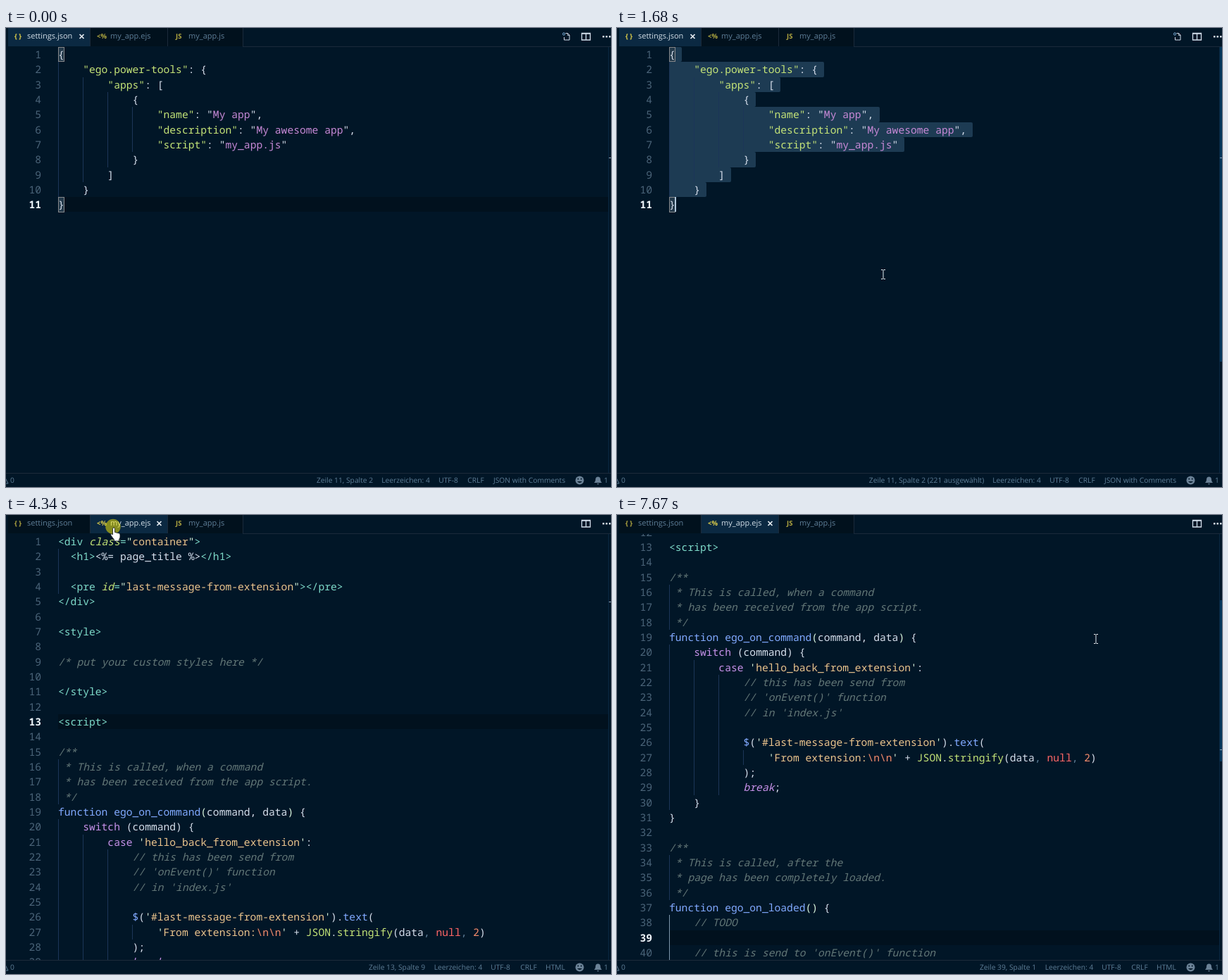
Write an HTML page that moves like this. It is 859x652 px and loops after 8 s.

```html
<!DOCTYPE html>
<html lang="en">
<head>
<meta charset="utf-8">
<title>Editor</title>
<style>
html, body { margin: 0; width: 100%; height: 100%; overflow: hidden; background: #011627; }
#stage { position: relative; width: 859px; height: 652px; overflow: hidden; background: #011627;
  font-family: "Open Sans", "Noto Sans", sans-serif; text-rendering: geometricPrecision; }
#stage div, svg { position: absolute; }
svg { left: 0; top: 0; overflow: visible; }
[hidden] { display: none !important; }

.tab { top: 0; height: 26px; background: #01111d; border-right: 1px solid #1b2a3b; box-sizing: border-box;
  font-size: 11px; line-height: 24px; color: #5f7e97; white-space: pre; }
.tab.on { background: #0b2942; color: #d2dee7; }
.tab .icon { color: #e0d04a; opacity: .8; font-weight: 700; }
.tab.on .icon { opacity: 1; }
.rule { left: 336px; top: 26px; width: 523px; height: 1px; background: #1a293a; }

#view { left: 0; top: 27px; width: 859px; height: 605px; overflow: hidden; }
.code { left: 0; top: 0; width: 859px; font: 14.66px/21.33px "Noto Sans Mono", "DejaVu Sans Mono", monospace; }
.line, .num { padding-top: 1px; white-space: pre; }
.line { left: 74px; color: #d6deeb; }
.num { left: 0; width: 50px; text-align: right; color: #4b6479; }
.num.on { color: #eef4fa; font-weight: 700; }
.hl { background: #01111e; }
.sel { background: #1d3b53; border-radius: 0 2px 2px 0; }
.guide { background: #1c3558; }
.guide.on { background: #7e97ac; }
.match { background: #243a4b; border: 1px solid #85878a; box-sizing: border-box; }
.caret { background: #b4c9db; }
.k { color: #c5e478; } .v { color: #c789d6; } .t { color: #7fdbca; } .s { color: #ecc48d; }
.q { color: #d9f5dd; } .b { color: #82aaff; } .p { color: #c792ea; } .n { color: #f78c6c; }
.r { color: #ff6666; } .d { color: #5f7e97; }
.a { color: #c5e478; font-style: italic; }
.c { color: #637777; font-style: italic; }
.i { color: #c792ea; font-style: italic; }

.edge { left: 855px; top: 27px; width: 1px; height: 605px; background: #0a2740; }
.slider { left: 856px; width: 3px; background: #04365a; }
.mark { left: 856px; width: 3px; height: 1px; background: #8fa6b8; }

#status { left: 0; top: 632px; width: 859px; height: 20px; border-top: 1px solid #1d2a3a;
  box-sizing: border-box; font-size: 10.25px; line-height: 20px; color: #5f7e97; white-space: pre; }
#status .item { transform: translateX(-50%); }
</style>
</head>
<body>
<div id="stage">
  <div class="rule"></div>
  <div id="view"></div>
  <div class="edge"></div>
  <div id="status"></div>
  <svg width="859" height="652" fill="none">
    <g id="openIcon" stroke="#d6deeb">
      <path d="M794.500 7.500h3l2.500 2.500v7h-7.500v-4"/>
      <circle cx="792" cy="8.500" r="1.600" stroke="#7fb2dc"/>
      <path d="M797.500 7.500v3h2.500" stroke-width=".8"/>
    </g>
    <path d="M817.500 7.500h12v9.500h-12zM823.500 8v9M817 8h13" stroke="#d6deeb" stroke-width="1.300"/>
    <path d="M847 11h2.500v2.500h-2.500zM851.500 11h2.500v2.500h-2.500zM856 11h2.500v2.500h-2.500z" fill="#d6deeb"/>
    <path d="M-4 647L-1 639L3 647z" stroke="#5f7e97"/>
    <circle cx="814.500" cy="642.500" r="6" fill="#6b8297"/>
    <path d="M811 644q3.500 4 7 0z" fill="#011627"/>
    <path d="M812.300 639.500v2M816.700 639.500v2" stroke="#011627" stroke-width="1.500"/>
    <path d="M835 646q2-1.500 2-4.500q0-4 3.500-4t3.500 4q0 3 2 4.500zM839 647h3l-1.500 1.800z" fill="#6b8297"/>
    <circle id="click" r="10.700" fill="#fff000" fill-opacity=".5"/>
    <g id="beam" stroke="#e6ebf0">
      <path d="M-3 -6.500h2.500M.500 -6.500h2.500M0 -6v12M-3 6.500h2.500M.500 6.500h2.500"/>
    </g>
    <path id="hand" fill="#fff" stroke="#101820" stroke-width=".8"
      d="M-1.500 1.500q0-1.500 1.500-1.500t1.500 1.500v5l6 1.500q1.500.500 1.500 2v3q0 2-1.500 3.500v2.500h-7v-2l-4.500-6q-.800-1.500.500-2t2 1z"/>
    <path id="arrow" fill="#fff" stroke="#101820" stroke-width=".8" d="M0 0v13l3-2.800l2 4.600l2-.9l-2-4.500h4z"/>
  </svg>
</div>
<script>
const LOOP = 8000, LINE = 64 / 3, CHAR = 8.796, LEFT = 74, VIEW = 605;
const $ = id => document.getElementById(id);
const stage = $('stage');

// "~x" switches to the colour class x
const JSON_LINES = [
  '{',
  '    ~k"ego.power-tools"~w: {',
  '        ~k"apps"~w: [',
  '            {',
  '                ~k"name"~w: "~vMy app~w",',
  '                ~k"description"~w: "~vMy awesome app~w",',
  '                ~k"script"~w: "~vmy_app.js~w"',
  '            }',
  '        ]',
  '    }',
  '}'
];
const EJS_LINES = [
  '~t<div ~aclass~t=~q"~scontainer~q"~t>',
  '  ~t<h1>~w<%= page_title %>~t</h1>',
  '',
  '  ~t<pre ~aid~t=~q"~slast-message-from-extension~q"~t></pre>',
  '~t</div>',
  '',
  '~t<style>',
  '',
  '~c/* put your custom styles here */',
  '',
  '~t</style>',
  '',
  '~t<script>',
  '',
  '~c/**',
  ' ~c* This is called, when a command',
  ' ~c* has been received from the app script.',
  ' ~c*/',
  '~bfunction ego_on_command~q(~wcommand, data~q) ~w{',
  '    ~pswitch ~w(command) {',
  '        ~pcase ~q\'~shello_back_from_extension~q\'~w:',
  '            ~c// this has been send from',
  '            ~c// \'onEvent()\' function',
  '            ~c// in \'index.js\'',
  '',
  '            ~b$~w(~q\'~s#last-message-from-extension~q\'~w).~btext~w(',
  '                ~q\'~sFrom extension:~n\\n\\n~q\'~w + ~kJSON~w.~kstringify~w(data~d, ~rnull~d, ~n2~w)',
  '            );',
  '            ~ibreak~w;',
  '    }',
  '}',
  '',
  '~c/**',
  ' ~c* This is called, after the',
  ' ~c* page has been completely loaded.',
  ' ~c*/',
  '~bfunction ego_on_loaded~q() ~w{',
  '    ~c// TODO',
  '',
  '    ~c// this is send to \'onEvent()\' function'
];

function add(parent, cls, text, box = {}) {
  const el = document.createElement('div');
  el.className = cls;
  el.textContent = text;
  for (const key in box) el.style[key] = box[key] + 'px';
  parent.append(el);
  return el;
}
const plain = line => line.replace(/~./g, '');
const lineTop = n => Math.round((n - 1) * LINE);
const lineBox = (n, left, width) => ({ left, width, top: lineTop(n), height: lineTop(n + 1) - lineTop(n) });

function indents(lines) {
  const own = lines.map(l => l ? plain(l).search(/\S/) : -1);
  return own.map((k, i) => k < 0 ? Math.min(own[i - 1], own[i + 1] ?? 0) : k);
}

function makeEditor(lines, total, matches) {
  const root = add($('view'), 'code', '');
  const ed = { root, nums: [], range: total * LINE - LINE + VIEW };
  ed.hl = add(root, 'hl', '', { left: LEFT, width: 782 });
  ed.sel = add(root, '', '');
  ed.match = add(root, '', '');
  matches.forEach(([n, col]) =>
    add(ed.match, 'match', '', lineBox(n, Math.floor(LEFT + col * CHAR), 9)));
  ed.bright = [];
  indents(lines).forEach((depth, i) => {
    for (let col = 0; col < depth; col += 4) {
      const g = add(root, 'guide', '', lineBox(i + 1, Math.floor(LEFT + col * CHAR), 1));
      if (i > 36) ed.bright.push(g);
    }
  });
  lines.forEach((line, i) => {
    const n = i + 1, text = plain(line), top = lineTop(n);
    const len = text.length + (n < lines.length ? 1 : 0);
    add(ed.sel, 'sel', '', lineBox(n, LEFT, len * CHAR));
    ed.nums.push(add(root, 'num', n, { top }));
    const row = add(root, 'line', '', { top });
    ('~w' + line).split('~').slice(1).forEach(part => {
      const span = document.createElement('span');
      span.className = part[0];
      span.textContent = part.slice(1);
      row.append(span);
    });
  });
  ed.caret = add(root, 'caret', '', { width: 2 });
  return ed;
}

const json = makeEditor(JSON_LINES, 11, [[1, 0], [11, 0]]);
const ejs = makeEditor(EJS_LINES, 47.6, [[13, 0], [13, 7]]);
const slider = add(stage, 'slider', '');
const mark = add(stage, 'mark', '');

// left, width, icon, icon x, label, label x
const tabs = [
  [3, 117, '{ }', 9, 'settings.json', 27],
  [120, 110, '<%', 9, 'my_app.ejs', 28],
  [230, 107, 'JS', 11, 'my_app.js', 29]
].map(([left, width, icon, ix, label, lx]) => {
  const el = add(stage, 'tab', '', { left, width });
  add(el, 'icon', icon, { left: ix, fontSize: 9.5 });
  add(el, '', label, { left: lx });
  const x = document.createElementNS('http://www.w3.org/2000/svg', 'svg');
  x.innerHTML = `<path d="M${width - 15.5} 9l6 6m0-6l-6 6" stroke="#e8eef4" stroke-width="1.7"/>`;
  el.append(x);
  return { el, x };
});
stage.append(stage.querySelector('#stage > svg'));

const status = $('status');
add(status, '', '0', { left: 6 });
add(status, '', '1', { left: 849 });
const items = Array.from({ length: 5 }, () => add(status, 'item', ''));
const JSON_BAR = [[481, ''], [567.5, 'Leerzeichen: 4'], [628, 'UTF-8'], [667, 'CRLF'], [743, 'JSON with Comments']];
const EJS_BAR = [[555, ''], [642, 'Leerzeichen: 4'], [702, 'UTF-8'], [742, 'CRLF'], [780, 'HTML']];

const BLINKS = [590, 1070, 1600, 2230, 2700, 3160, 3560, 4340, 4410, 4870, 5340, 5810, 6330, 6800, 7200, 7670];
const CLICKS = [[590, 670, 375.5, 349], [3560, 3640, 375.5, 349], [4340, 4410, 152, 16.5]];
const out = p => 1 - (1 - p) ** 2;
const smooth = p => p * p * (3 - 2 * p);
// start, end, steps, from, to, easing
const MOVES = [
  [130, 440, 5, [440, 811], [378, 350], out],
  [3715, 4262, 8, [378, 350], [153, 18], smooth],
  [5180, 5870, 10, [153, 18], [841, 133], smooth],
  [6030, 6330, 5, [841, 133], [680, 176], smooth]
];

function mouseAt(t) {
  let pos = MOVES[0][3];
  for (const [t0, t1, steps, from, to, ease] of MOVES) {
    if (t < t0) break;
    const k = Math.min(steps, 1 + Math.floor((t - t0) / (t1 - t0) * (steps - 1) + 1e-6));
    const p = ease(k / steps);
    pos = from.map((v, i) => v + (to[i] - v) * p);
  }
  return pos;
}

const within = (t, a, b) => t >= a && t < b;

function drawMouse(t) {
  const [x, y] = mouseAt(t);
  const kind = y > 632 ? 'arrow' : y > 27 ? 'beam' : x < 336 ? 'hand' : 'arrow';
  for (const id of ['beam', 'hand', 'arrow']) {
    const el = $(id);
    el.style.display = t >= 130 && id === kind ? '' : 'none';
    el.setAttribute('transform', `translate(${Math.round(x)} ${Math.round(y)})`);
  }
  const hit = CLICKS.find(([a, b]) => within(t, a, b));
  $('click').style.display = hit ? '' : 'none';
  if (hit) $('click').setAttribute('transform', `translate(${hit[2]} ${hit[3]})`);
}

function render(t) {
  const second = t >= 4340, paged = t >= 7120;
  const ed = second ? ejs : json;
  const selected = within(t, 1600, 3560);
  const row = !second ? 11 : paged ? 39 : 13;
  const scroll = paged ? 248 : 0;

  json.root.hidden = second;
  ejs.root.hidden = !second;
  ed.root.style.top = -scroll + 'px';
  ed.sel.hidden = !selected;
  ed.hl.hidden = selected;
  ed.hl.style.top = lineTop(row) + 'px';
  ed.hl.style.height = ed.caret.style.height = '21px';
  ed.match.hidden = second ? !within(t, 4410, 7120) : within(t, 1770, 3640);
  ed.nums.forEach((el, i) => el.classList.toggle('on', i + 1 === row));
  ed.bright.forEach(g => g.classList.toggle('on', paged));
  ed.caret.hidden = BLINKS.filter(b => b <= t).length % 2 === 0;
  ed.caret.style.left = (!second ? 82 : paged ? 74 : 143) + 'px';
  ed.caret.style.top = lineTop(row) + 'px';

  const scale = VIEW / ed.range;
  slider.hidden = t < 130 || within(t, 4340, 4410);
  slider.style.top = 27 + scroll * scale + 'px';
  slider.style.height = VIEW * scale + 'px';
  mark.style.top = Math.floor(27 + (row - 1) * LINE * scale) + 'px';

  tabs.forEach(({ el, x }, i) => {
    const on = i === (second ? 1 : 0);
    el.classList.toggle('on', on);
    x.style.display = on ? '' : 'none';
  });
  $('openIcon').style.display = second ? 'none' : '';

  const counted = within(t, 1680, 3560);
  const place = !second ? 'Zeile 11, Spalte 2' + (counted ? ' (221 ausgewählt)' : '')
    : t >= 7200 ? 'Zeile 39, Spalte 1' : 'Zeile 13, Spalte 9';
  (second ? EJS_BAR : JSON_BAR).forEach(([x, text], i) => {
    items[i].style.left = (i === 0 && counted ? 439.5 : x) + 'px';
    items[i].textContent = i ? text : place;
  });
  drawMouse(t);
}

const start = performance.now();
function tick() {
  render((performance.now() - start) % LOOP);
  requestAnimationFrame(tick);
}
tick();
</script>
</body>
</html>
```
